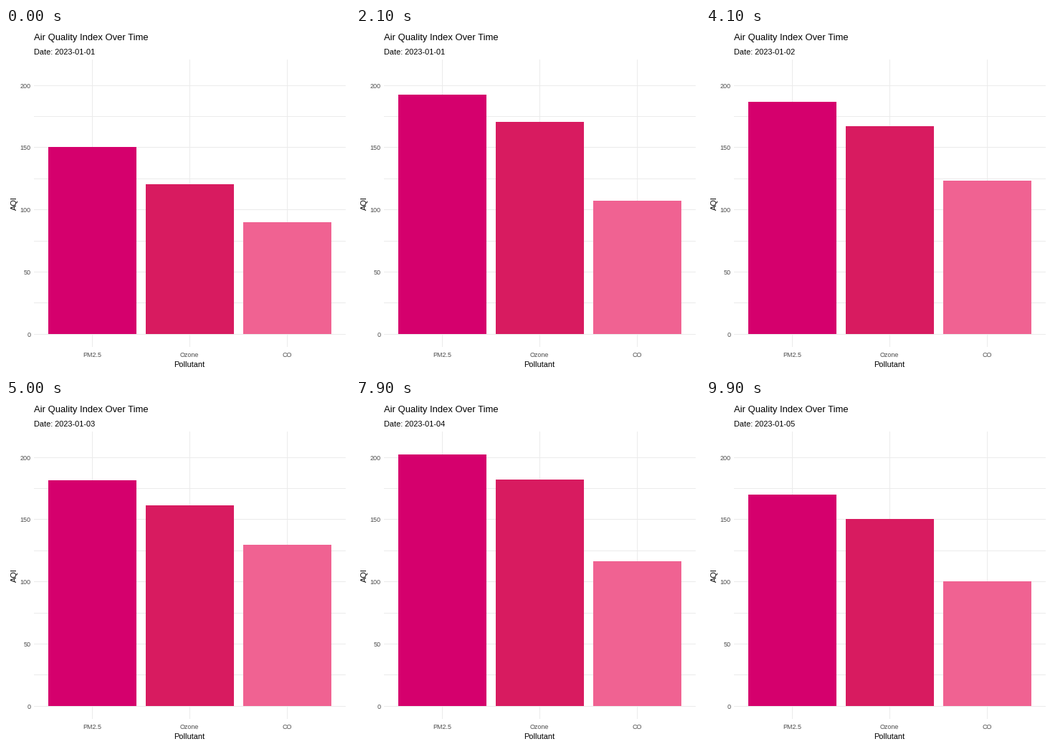
These frames come from a looping animation (480 px wide and 480 px high, 10 s). A matplotlib script:

```python
import matplotlib.pyplot as plt
import numpy as np
from matplotlib.animation import FuncAnimation
from matplotlib.patches import Rectangle

SIZE, DPI = 480, 100
FRAMES, INTERVAL = 100, 100
LEFT, RIGHT, TOP, BOTTOM = 39, 474, 44, 445
ZERO_Y, UNIT = 426.75, 1.7359  # pixel row of AQI 0, pixels per AQI unit
GRID, TICK_INK = "#EBEBEB", "#4D4D4D"

# Frame on which each daily reading is reached
KEYS = [0, 25, 49, 74, 99]
# name, colour, bar left edge, daily readings
SERIES = [
    ("PM2.5", "#D5006D", 59, [150, 200, 180, 210, 170]),
    ("Ozone", "#D81B60", 195, [120, 180, 160, 190, 150]),
    ("CO", "#F06292", 331, [90, 110, 130, 120, 100]),
]
BAR_W = 123

plt.rcParams["font.family"] = "Liberation Sans"
fig = plt.figure(figsize=(SIZE / DPI, SIZE / DPI), dpi=DPI, facecolor="white")
ax = fig.add_axes([0, 0, 1, 1])
ax.set(xlim=(0, SIZE), ylim=(SIZE, 0))
ax.axis("off")


def row(value):
    return int(np.floor(ZERO_Y - UNIT * value + 0.5))


def box(x, y, w, h, color, z):
    patch = Rectangle((x, y), w, h, facecolor=color, linewidth=0,
                      antialiased=False, zorder=z)
    return ax.add_patch(patch)


def label(x, y, text, px, color="black", ha="left", **kw):
    return ax.text(x, y, text, fontsize=px * 72 / DPI, color=color,
                   ha=ha, va="baseline", **kw)


for value in range(0, 201, 25):
    box(LEFT, row(value), RIGHT - LEFT, 1, GRID, 1)
    if value % 50 == 0:
        label(34.3, row(value) + 4, str(value), 9, TICK_INK, "right")

bars = []
for name, color, x, _ in SERIES:
    mid = x + BAR_W // 2
    box(mid, TOP, 1, BOTTOM - TOP, GRID, 1)
    label(mid, 459, name, 9, TICK_INK, "center")
    bars.append(box(x, row(0), BAR_W, 0, color, 2))

label(39, 17, "Air Quality Index Over Time", 13)
subtitle = label(39, 37, "", 11)
label(256, 473, "Pollutant", 11, ha="center")
ax.text(15, 244.5, "AQI", fontsize=11 * 72 / DPI, rotation=90,
        rotation_mode="anchor", ha="center", va="baseline")


def update(i):
    for bar, (_, _, _, readings) in zip(bars, SERIES):
        top = row(np.interp(i, KEYS, readings))
        bar.set_y(top)
        bar.set_height(row(0) - top)
    day = 1 + 4 * i // (FRAMES - 1)
    subtitle.set_text(f"Date: 2023-01-{day:02d}")
    return [*bars, subtitle]


anim = FuncAnimation(fig, update, frames=FRAMES, interval=INTERVAL,
                     repeat=True, repeat_delay=0)
plt.show()
```
